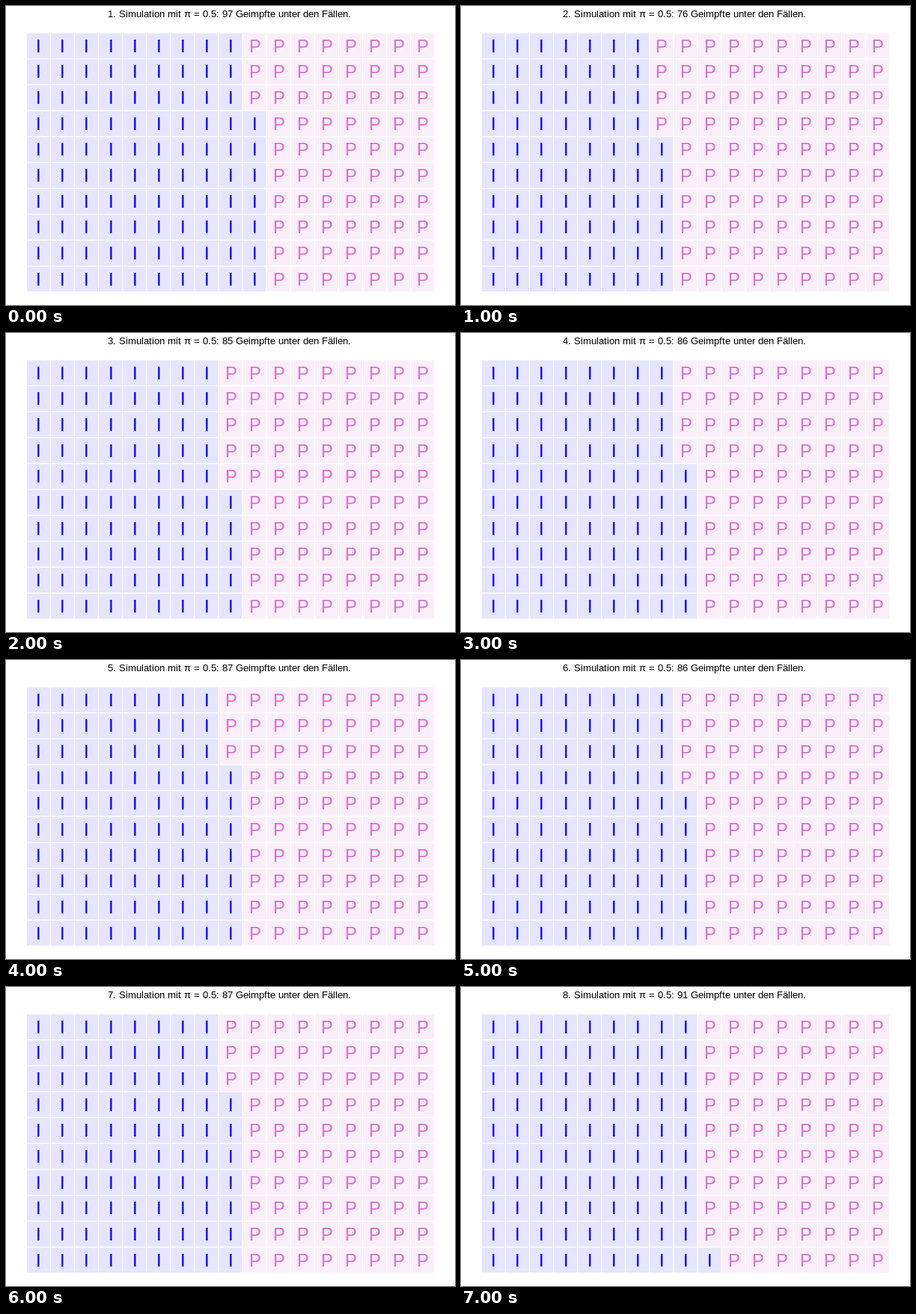
An HTML page for the animation above (8000 ms loop, 600x400 px).

```html
<!DOCTYPE html>
<html lang="de">
<head>
<meta charset="utf-8">
<title>Simulation</title>
<style>
  html, body { margin: 0; width: 100%; height: 100%; overflow: hidden; background: #fff; }
  svg { display: block; width: 600px; height: 400px; font-family: "Liberation Sans", Arial, sans-serif; }
  #title { font-size: 13.2px; }
  #cells { font-size: 24px; }
  rect { stroke: #fff; stroke-width: 1.1; }
  .I rect { fill: #e5e5ff; }
  .I text { fill: #00e; }
  .P rect { fill: #faeff9; }
  .P text { fill: #da70d6; }
</style>
</head>
<body>
<svg viewBox="0 0 600 400">
  <text id="title" y="15"></text>
  <g id="cells"></g>
</svg>
<script>
  const COLS = 17, ROWS = 10, W = 32.09, H = 34.67, LEFT = 27.25, TOP = 35.9;
  const STEP = 1000, TITLE_X = 136;
  const HALF = { I: 3.02, P: 7.48 };  // half letter widths
  const counts = [97, 76, 85, 86, 87, 86, 87, 91];
  const title = document.getElementById('title');
  const grid = document.getElementById('cells');
  const pen = document.createElement('canvas').getContext('2d');
  pen.font = '13.2px "Liberation Sans", Arial, sans-serif';

  function add(parent, tag, attrs = {}) {
    const el = document.createElementNS('http://www.w3.org/2000/svg', tag);
    for (const key in attrs) el.setAttribute(key, attrs[key]);
    return parent.appendChild(el);
  }

  // Every glyph starts on a whole pixel.
  function setTitle(text) {
    let x = TITLE_X;
    const starts = [...text].map(ch => {
      const at = x;
      x += Math.round(pen.measureText(ch).width);
      return at;
    });
    title.setAttribute('x', starts.join(' '));
    title.textContent = text;
  }

  // Cells run up each column from the bottom, then on to the next column.
  const cells = Array.from({ length: COLS * ROWS }, (_, i) => {
    const x = LEFT + Math.floor(i / ROWS) * W;
    const y = TOP + (ROWS - 1 - i % ROWS) * H;
    const group = add(grid, 'g');
    add(group, 'rect', { x, y, width: W, height: H });
    const label = add(group, 'text', { y: Math.round(y + H / 2 + 8.5) });
    return { group, label, mid: x + W / 2 };
  });

  function show(run) {
    const count = counts[run];
    setTitle(`${run + 1}. Simulation mit π = 0.5: ${count} Geimpfte unter den Fällen.`);
    cells.forEach(({ group, label, mid }, i) => {
      const kind = i < count ? 'I' : 'P';
      group.setAttribute('class', kind);
      label.setAttribute('x', Math.round(mid - HALF[kind]));
      label.textContent = kind;
    });
  }

  const start = performance.now();
  let current = -1;
  function tick() {
    const run = Math.floor((performance.now() - start) / STEP) % counts.length;
    if (run !== current) show(current = run);
    requestAnimationFrame(tick);
  }
  tick();
</script>
</body>
</html>
```
